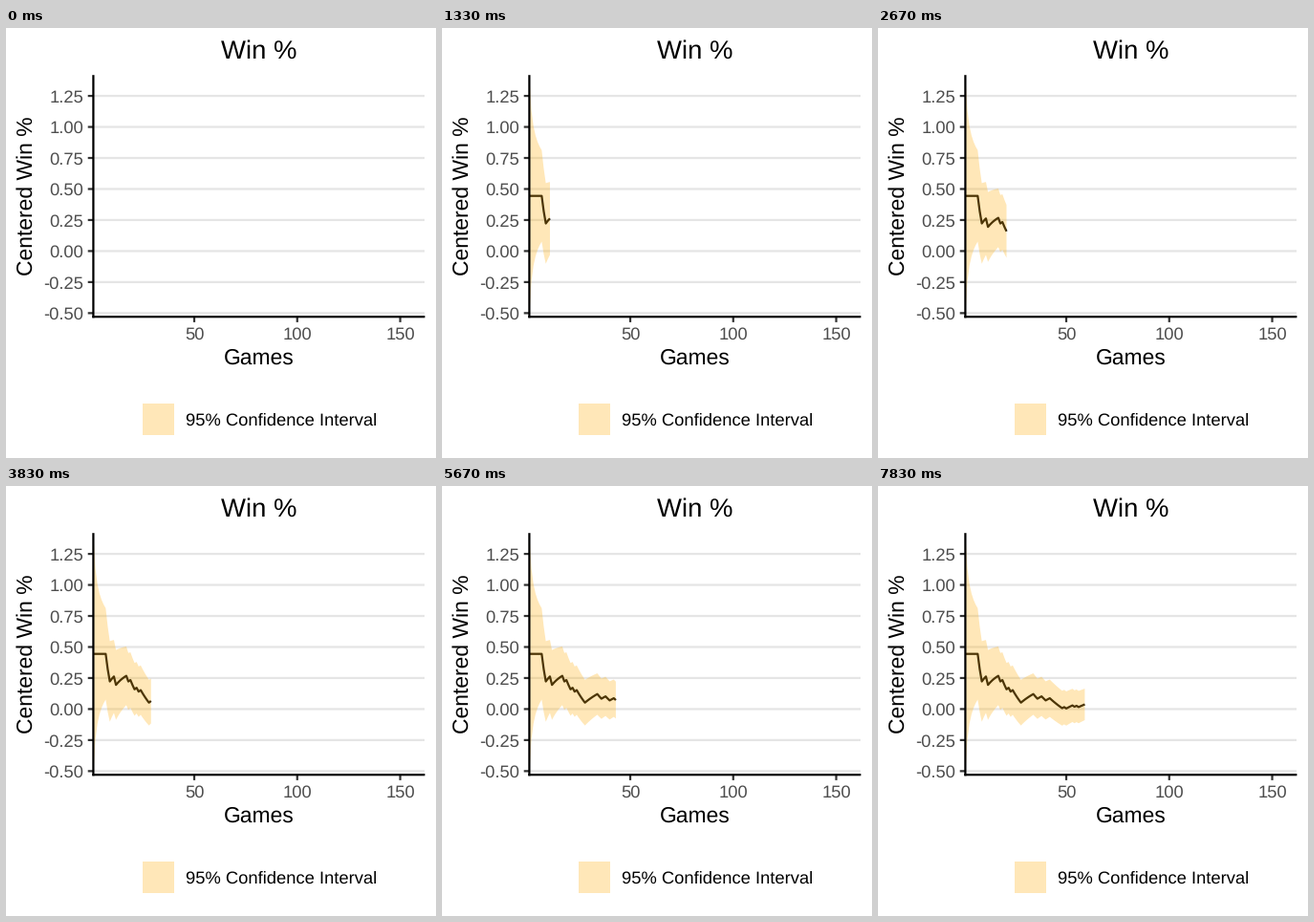
Write a matplotlib script that moves like this. It is 450 by 450 pixels and loops after 8 s.

```python
import numpy as np
import matplotlib.pyplot as plt
from matplotlib.animation import FuncAnimation
from matplotlib.patches import Polygon, Rectangle

SIZE, DPI = 450, 150
LOOP, INTERVAL = 8000, 40
STEPS = 48                      # distinct pictures per loop
GAMES_PER_STEP = 161 / 130
LEFT, RIGHT, TOP, BOTTOM = 91.4, 438.4, 49.2, 302.2
LINE = 0.5 * 72.27 / 25.4 * 72 / 96
GOLD = "#FFB214"

plt.rcParams.update({
    "font.family": "Liberation Sans",
    "text.hinting": "none",
    "path.simplify": False,
})

# Season: alternating winning and losing streaks, wins first
streaks = [7, 2, 2, 1, 5, 1, 1, 2, 1, 1, 1, 4, 6,
           2, 2, 2, 2, 6, 1, 1, 3, 1, 1, 1, 3]
results = np.concatenate([np.full(n, 1 - i % 2) for i, n in enumerate(streaks)])
games = np.arange(1, len(results) + 1)
season = 90 / 162
center = np.cumsum(results) / games - season
margin = 1.96 * np.sqrt(season * (1 - season) / games)
low, high = center - margin, center + margin

fig = plt.figure(figsize=(SIZE / DPI, SIZE / DPI), dpi=DPI, facecolor="white")
ax = fig.add_axes([LEFT / SIZE, 1 - BOTTOM / SIZE,
                   (RIGHT - LEFT) / SIZE, (BOTTOM - TOP) / SIZE])
ax.set_xlim(1, 162)
ax.set_ylim(low[0], high[0])
ax.axis("off")

# Overlay in pixel units, y downwards
page = fig.add_axes([0, 0, 1, 1])
page.set_xlim(0, SIZE)
page.set_ylim(SIZE, 0)
page.axis("off")


def px(game):
    return LEFT + (game - 1) / 161 * (RIGHT - LEFT)


def py(value):
    return TOP + (high[0] - value) / (high[0] - low[0]) * (BOTTOM - TOP)


def stroke(xs, ys, color):
    page.plot(xs, ys, color=color, lw=LINE, solid_capstyle="butt", snap=False)


def label(x, y, text, size, color="black", ha="center", rotation=0):
    page.text(x, y, text, fontsize=size, color=color, ha=ha, va="baseline",
              rotation=rotation, rotation_mode="anchor")


for value in np.arange(-0.5, 1.3, 0.25):
    y = py(value)
    ax.axhline(value, color="#E5E5E5", lw=LINE, snap=False, zorder=1)
    stroke([LEFT - 5.7, LEFT], [y, y], "#333333")
    label(81.1, y + 6.6, f"{value:.2f}", 8.8, "#4D4D4D", ha="right")

for game in (50, 100, 150):
    x = px(game)
    stroke([x, x], [BOTTOM, BOTTOM + 5.7], "#333333")
    label(x, 326, str(game), 8.8, "#4D4D4D")

stroke([LEFT, LEFT], [TOP, BOTTOM + 1.1], "black")
stroke([LEFT - 1.1, RIGHT], [BOTTOM, BOTTOM], "black")

mid_x, mid_y = (LEFT + RIGHT) / 2, (TOP + BOTTOM) / 2
label(mid_x, 32, "Win %", 13.2)
label(mid_x, 352, "Games", 11)
label(28, mid_y, "Centered Win %", 11, rotation=90)

page.add_patch(Rectangle((143, 393), 33, 33, fc=GOLD, alpha=0.3, lw=0))
label(188.3, 416, "95% Confidence Interval", 8.8, ha="left")

line, = ax.plot([], [], color="black", lw=LINE, solid_capstyle="butt",
                solid_joinstyle="round", zorder=2)
band = Polygon([(1, 0)] * 3, closed=True, fc=GOLD, alpha=0.3, lw=0, zorder=3)
ax.add_patch(band)


def update(frame):
    step = min(STEPS - 1, (frame * INTERVAL + INTERVAL - 1) * STEPS // LOOP)
    n = round(1 + step * GAMES_PER_STEP)
    x = games[:n]
    line.set_data(x, center[:n])
    band.set_xy(np.column_stack([np.r_[x, x[::-1]],
                                 np.r_[high[:n], low[:n][::-1]]]))
    line.set_visible(n > 1)
    band.set_visible(n > 1)
    return line, band


anim = FuncAnimation(fig, update, frames=LOOP // INTERVAL, interval=INTERVAL,
                     init_func=lambda: update(0), repeat=True, repeat_delay=0)
plt.show()
```
